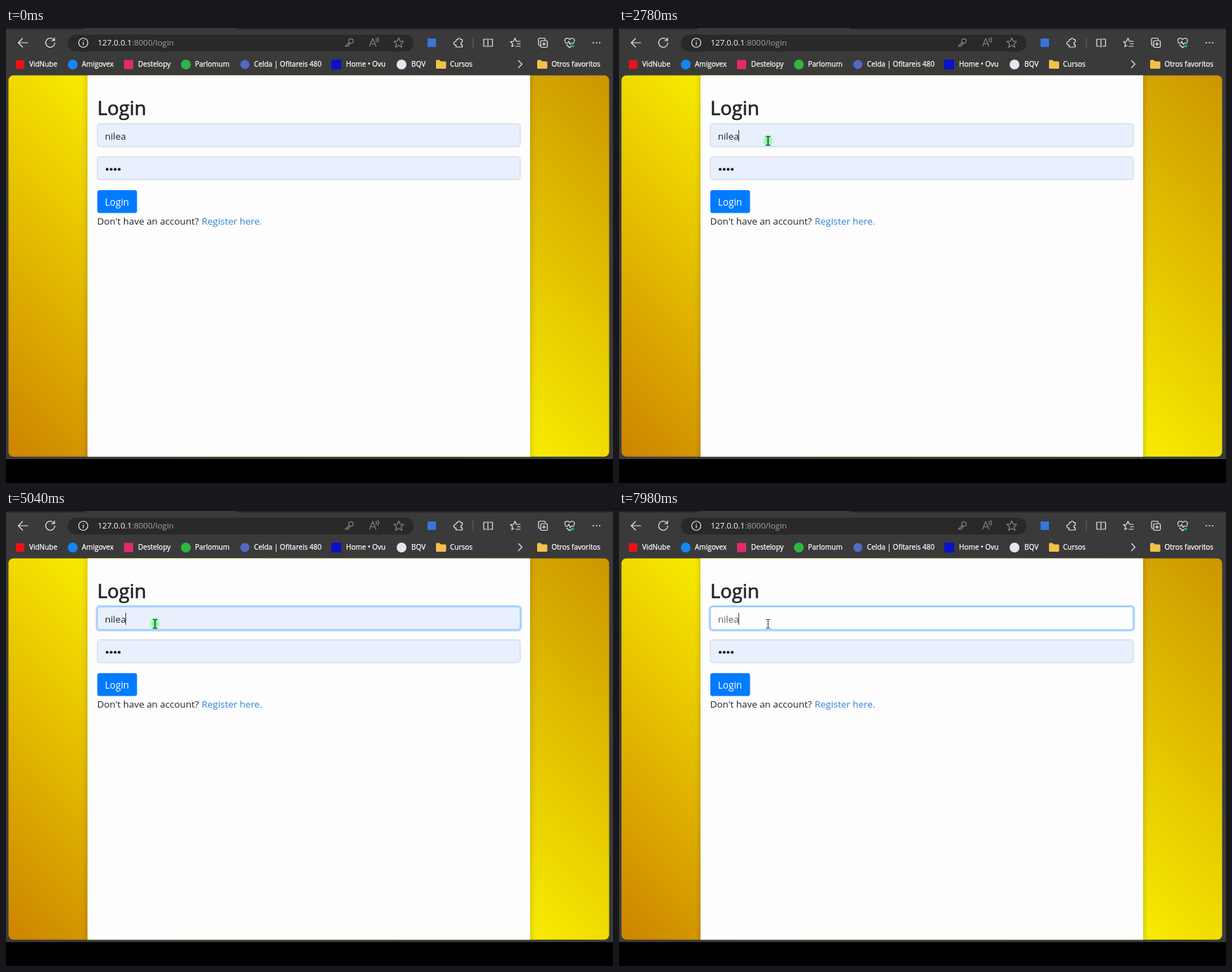
These frames come from a looping animation (864x648 px, 8 s). An HTML page:

```html
<!DOCTYPE html>
<html lang="es">
<head>
<meta charset="utf-8">
<title>Login</title>
<style>
  html, body { margin: 0; width: 100%; height: 100%; overflow: hidden; background: #000; }
  svg { display: block; width: 864px; height: 648px; }
  text { font: 13.4px "Open Sans", "Noto Sans", sans-serif; fill: #212529; white-space: pre; }
  #bookmarks text { font-size: 10px; fill: #fff; stroke: #fff; stroke-width: .25; }
  #heading { font-size: 27.4px; stroke: #212529; stroke-width: .7; }
  .icon { fill: none; stroke: #e8e8e8; stroke-width: 1.2; stroke-linecap: round; stroke-linejoin: round; }
  .dim { stroke: #858585; }
  .field { fill: #e7f0fc; stroke: #ced4da; }
  #panel { filter: drop-shadow(0 0 5px rgba(0, 0, 0, .22)); }
</style>
</head>
<body>
<svg viewBox="0 0 864 648">
  <defs>
    <linearGradient id="gold" gradientUnits="userSpaceOnUse" x1="81.5" y1="689" x2="780.5" y2="-10">
      <stop offset="0" stop-color="#cc8400"/>
      <stop offset=".5" stop-color="#fbf200"/>
      <stop offset="1" stop-color="#cc9600"/>
    </linearGradient>
    <radialGradient id="glow">
      <stop offset="0" stop-color="#4be65a" stop-opacity=".85"/>
      <stop offset=".55" stop-color="#7df08a" stop-opacity=".5"/>
      <stop offset="1" stop-color="#b4f5bc" stop-opacity="0"/>
    </radialGradient>
    <clipPath id="view"><rect x="3.5" y="67.5" width="855" height="543" rx="7"/></clipPath>
    <path id="folder" d="M0 1.5q0-1.5 1.5-1.5H5l2 2h6q1.5 0 1.5 1.5V11q0 1.5-1.5 1.5H1.5Q0 12.5 0 11z" fill="#f3c04b"/>
    <path id="star" d="M0-7 2-2.3 7-1.9 3.2 1.5 4.4 6.5 0 3.8-4.4 6.5-3.2 1.5-7-1.9-2-2.3z"/>
  </defs>

  <!-- Browser frame -->
  <rect width="864" height="614" fill="#3a3a3b"/>
  <path d="M0 0H114Q112 2 109 2H0zM327 0H864V2H332Q329 2 327 0z" fill="#262627"/>
  <rect x="88" y="9.5" width="492" height="24" rx="12" fill="#29292a"/>
  <text x="130.500" y="25" style="font-size:11.5px;fill:#a4a4a4"><tspan fill="#fff">127.0.0.1</tspan>:8000/login</text>

  <g class="icon">
    <path d="M31 21H17.5M23.5 15l-6 6 6 6"/>
    <path d="M68.5 17.5A6.500 6.500 0 1 0 69.5 21M69 14v4h-4"/>
    <circle cx="110" cy="21" r="6.5"/><path d="M110 20v4M110 17.5v.2"/>
    <path d="M641 16.5h2a2 2 0 0 1 4 0h2.500v3.500a2 2 0 0 0 0 4v3h-9v-3a2 2 0 0 1-1.500-4.500l1.500-.5z"/>
    <path d="M665 14V28" stroke="#606060"/>
    <path d="M686 15v12M684 16h-4v10h4M688 16h4.500v10H688"/>
    <path d="M723 25l-3 1.500 1-4.500-3-2.500 4.500-.5 2-4.500 2 4.500h5.500M728 22.500h4M726 26h6"/>
    <path d="M761 25h-1.500q-1.500 0-1.500-1.500V16q0-1.500 1.500-1.500H766q1.500 0 1.500 1.500v1"/>
    <rect x="761" y="18" width="9.5" height="9.5" rx="1.5"/><path d="M765.700 20.500v4.500M763.500 22.800h4.500"/>
    <path d="M796 20q-2-5 3-5.500 2 0 3.300 2 1.300-2 3.700-2 4.500.5 2.500 5.500M796 21.500h3.500l1.500-2.500 2 4.500 1.500-2h4M798 24l4.300 4 2-2"/>
    <path d="M729.500 46.500l5 5-5 5"/>
  </g>
  <g class="icon dim">
    <circle cx="491" cy="18.5" r="3.2"/><path d="M488.500 20.500l-5.500 5.500h3.500l3.500-4"/>
    <path d="M517.500 26l4.500-11 4.500 11M519 22.500h6M526.500 15q2 2 0 4.500M529 13.500q3 3.500 0 7"/>
    <use href="#star" x="559" y="21"/>
  </g>
  <circle cx="806.5" cy="25.5" r="2.3" fill="#2ea04c"/>
  <g fill="#e8e8e8"><circle cx="836" cy="21" r="1"/><circle cx="840.5" cy="21" r="1"/><circle cx="845" cy="21" r="1"/></g>
  <rect x="600" y="15" width="12" height="12" fill="#3974d9"/>

  <g id="bookmarks">
    <rect x="14" y="46" width="12" height="12" fill="#f00f16"/><text x="33" y="55.3">VidNube</text>
    <circle cx="95" cy="52" r="7" fill="#1687f2"/><text x="108" y="55.3">Amigovex</text>
    <rect x="168" y="45.5" width="13" height="13" fill="#e22c68"/><text x="188" y="55.3">Destelopy</text>
    <circle cx="256" cy="52" r="7" fill="#2cb742"/><text x="269" y="55.3">Parlomum</text>
    <circle cx="340" cy="52" r="6.5" fill="#5568c4"/><text x="353" y="55.3">Celda | Ofitareis 480</text>
    <rect x="463" y="45" width="14" height="14" fill="#0a12c8"/><text x="484" y="55.3">Home • Ovu</text>
    <circle cx="563" cy="52" r="7" fill="#e4e8ec"/><text x="577" y="55.3">BQV</text>
    <use href="#folder" x="612" y="45.5"/><text x="632" y="55.3">Cursos</text>
    <use href="#folder" x="756" y="45.5"/><text x="776.5" y="55.3">Otros favoritos</text>
  </g>

  <!-- Page -->
  <g clip-path="url(#view)">
    <rect x="3" y="67" width="856" height="544" fill="url(#gold)"/>
    <rect id="panel" x="116" y="50" width="630" height="580" fill="#fdfdfd"/>
  </g>
  <text id="heading" x="130" y="123.5">Login</text>
  <rect id="ring" x="128.8" y="135.3" width="604.4" height="34.9" rx="4.5" fill="none" stroke="#007bff" stroke-width="2.4"/>
  <rect id="user" class="field" x="130" y="136.5" width="602" height="32.5" rx="3.5"/>
  <text id="name" x="140.7" y="158.5"></text>
  <rect id="caret" y="145" width="1" height="17" fill="#444"/>
  <rect class="field" x="130" y="183.5" width="602" height="32.5" rx="3.5"/>
  <g fill="#111"><circle cx="144" cy="201.3" r="2"/><circle cx="149.7" cy="201.3" r="2"/><circle cx="155.4" cy="201.3" r="2"/><circle cx="161.1" cy="201.3" r="2"/></g>
  <rect x="130" y="231" width="56.5" height="32.5" rx="3" fill="#007bff"/>
  <text x="140.7" y="252.5" style="font-size:13.6px;fill:#fff">Login</text>
  <text x="129.7" y="279.5">Don't have an account?</text>
  <text x="278.5" y="279.5" style="fill:#2f80dc">Register here.</text>

  <g id="pointer">
    <ellipse id="halo" cx="212" cy="160.5" rx="9" ry="11" fill="url(#glow)"/>
    <path id="beam" d="M209 154.500h2.200l1 .8 1-.8h2.300M212.200 155v11.500M209 167h2.200l1-.8 1 .8h2.300" fill="none" stroke="#0a6b22"/>
  </g>
</svg>
<script>
  const LOOP = 8000, POINTER_IN = 2600, CLICK = 2760, TYPE = 6100, ERASE = 6700, HALO_OUT = 7000;
  const BLINK = 500, FOCUS_MS = 150;
  const $ = id => document.getElementById(id);
  const show = (id, on) => $(id).setAttribute("visibility", on ? "visible" : "hidden");
  const clamp = v => Math.max(0, Math.min(1, v));
  const ease = p => p * p * (3 - 2 * p);
  const mix = (a, b, p) => `rgb(${a.map((v, i) => Math.round(v + (b[i] - v) * p))})`;

  function draw(t) {
    const edited = t >= TYPE;
    const focus = ease(clamp((t - CLICK) / FOCUS_MS));
    $("ring").style.opacity = focus * .27;
    $("user").style.stroke = mix([206, 212, 218], [128, 189, 255], focus);
    $("user").style.fill = edited ? "#fdfdfd" : "";

    const name = $("name");
    name.textContent = edited && t < ERASE ? "nilea@" : "nilea";
    name.style.fill = edited ? "#5a6067" : "#222";

    // Each keystroke restarts the caret's blink
    const lastInput = t >= ERASE ? ERASE : edited ? TYPE : CLICK;
    $("caret").setAttribute("x", Math.round(140.7 + name.getComputedTextLength() - .5));
    show("caret", t >= CLICK && Math.floor((t - lastInput) / BLINK) % 2 === 0);

    const halo = t >= POINTER_IN && t < HALO_OUT;
    show("beam", t >= POINTER_IN);
    show("halo", halo);
    $("beam").style.strokeWidth = halo ? 1.7 : 1.2;
  }

  function tick() {
    draw(performance.now() % LOOP);
    requestAnimationFrame(tick);
  }
  tick();
</script>
</body>
</html>
```
